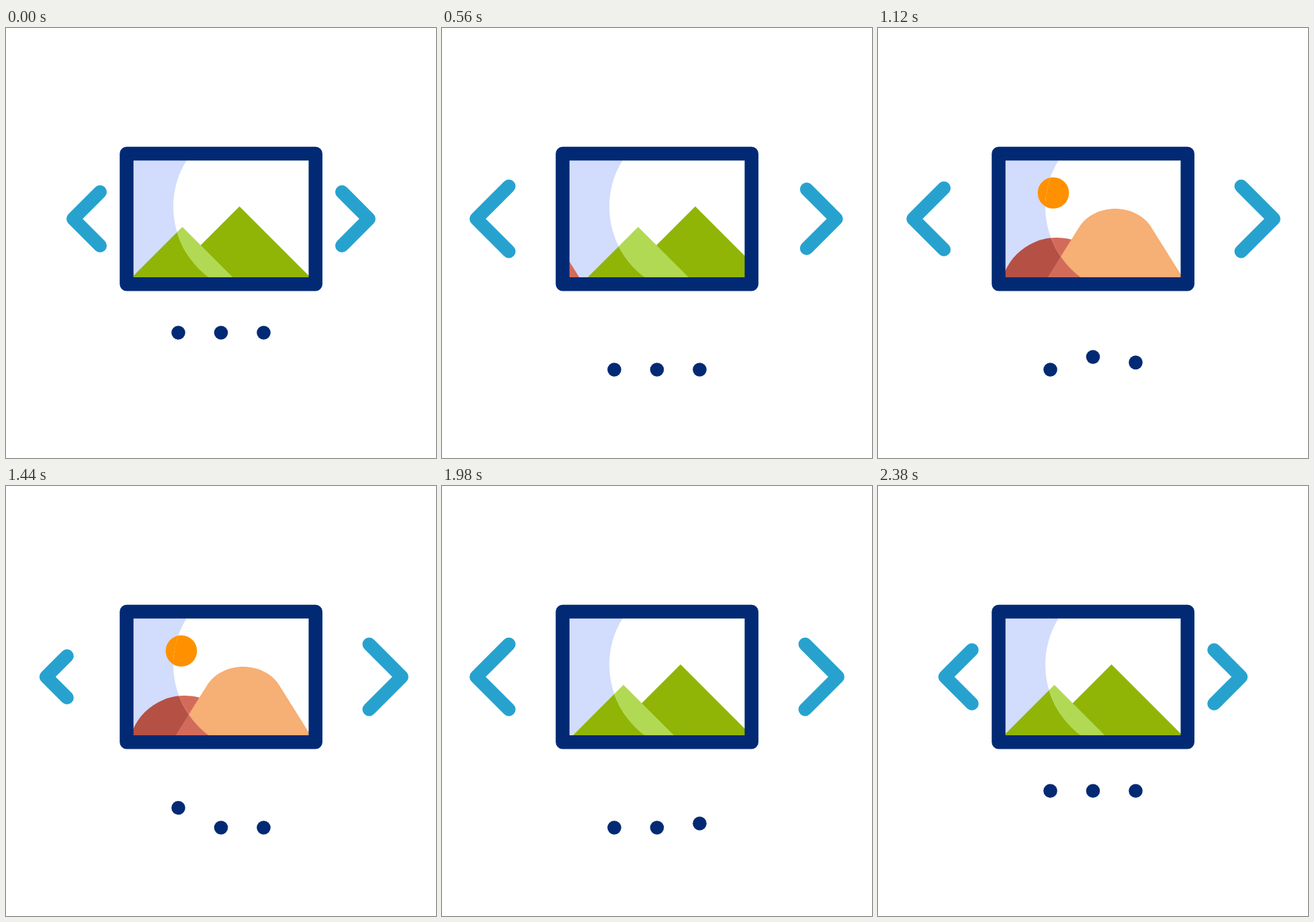
Animation, 640 px wide and 640 px high, one loop 2.4 s. Source, as an HTML page:

```html
<!DOCTYPE html>
<html lang="en">
<head>
<meta charset="utf-8">
<title>Image carousel</title>
<style>
  html, body { margin: 0; height: 100%; overflow: hidden; background: #fff; }
  svg { display: block; width: 100vw; height: 100vh; }
  .shade { --sky: #d2dcfd; --leaf: #90b507; --ridge: #90b507; --dune: #d36b5b; --rock: #b55045; }
  .light { --sky: #fff; --leaf: #b1d954; --ridge: #90b507; --dune: #f6af74; --rock: #d36b5b; }
  .arrow { fill: none; stroke: #27a2cf; stroke-width: 20; stroke-linecap: round; stroke-linejoin: round; }
</style>
</head>
<body>
<svg viewBox="0 0 640 640">
  <defs>
    <clipPath id="window"><rect x="185" y="192" width="271" height="185"/></clipPath>
    <clipPath id="glow"><circle cx="380" cy="266" r="131"/></clipPath>
    <g id="scene">
      <rect x="185" y="192" width="271" height="185" style="fill:var(--sky)"/>
      <g id="mountains">
        <path d="M237 376 347.5 265.5 458 376z" style="fill:var(--ridge)"/>
        <path d="M182.5 376 262.5 296 342.5 376z" style="fill:var(--leaf)"/>
      </g>
      <g id="dunes">
        <circle cx="266" cy="396" r="84" style="fill:var(--rock)"/>
        <path d="M249.5 376 299 297C311 278 332 269 353 269S395 278 407 297L456.5 376z" style="fill:var(--dune)"/>
        <circle cx="261" cy="245.5" r="23.3" fill="#ff9100"/>
      </g>
    </g>
  </defs>
  <g clip-path="url(#window)">
    <use href="#scene" class="shade"/>
    <g clip-path="url(#glow)"><use href="#scene" class="light"/></g>
  </g>
  <rect x="179.5" y="186.9" width="281.2" height="194.4" fill="none" stroke="#022a74" stroke-width="20.5" stroke-linejoin="round"/>
  <path id="left" class="arrow"/>
  <path id="right" class="arrow"/>
  <g id="dots" fill="#022a74">
    <circle cx="256.5" r="10.3"/>
    <circle cx="320" r="10.3"/>
    <circle cx="383.5" r="10.3"/>
  </g>
</svg>
<script>
const LOOP = 2400, SLIDE = 278.5;
const $ = id => document.getElementById(id);
const dots = [...$('dots').children];

const ramp = (t, from, to) => Math.min(1, Math.max(0, (t - from) / (to - from)));
const smooth = u => u * u * (3 - 2 * u);
const gentle = u => (u + smooth(u)) / 2;
const ease = (t, from, to) => smooth(ramp(t, from, to));

// Slow squeeze, quick release
const press = (t, start) =>
  gentle(ramp(t, start, start + 400)) - gentle(ramp(t, start + 400, start + 600));

const hop = (t, start) =>
  ease(t, start, start + 200) - ease(t, start + 200, start + 400);

function drawArrow(id, side, open, squeeze) {
  const arm = 40 + 8.5 * open - 17.5 * squeeze;
  const center = 320 + side * (200 + 44.75 * open);
  const tip = center + side * (20 + 4.25 * open - 8.75 * squeeze);
  const end = tip - side * arm;
  $(id).setAttribute('d', `M${end} ${284 - arm}L${tip} 284 ${end} ${284 + arm}`);
}

function render(t) {
  const open = ease(t, 140, 540) - ease(t, 1985, 2398);
  const shift = SLIDE * (ease(t, 440, 1040) - ease(t, 1440, 2040));

  $('mountains').setAttribute('transform', `translate(${shift})`);
  $('dunes').setAttribute('transform', `translate(${shift - SLIDE})`);
  drawArrow('left', -1, open, press(t, 1040));
  drawArrow('right', 1, open, press(t, 440));

  dots.forEach((dot, i) => {
    const start = 640 + 200 * i;
    const lift = hop(t, start) + hop(t, start + 600);
    dot.setAttribute('cy', 453.5 + 55 * open - 29.5 * lift);
  });
}

function tick() {
  render(performance.now() % LOOP);
  requestAnimationFrame(tick);
}
tick();
</script>
</body>
</html>
```
